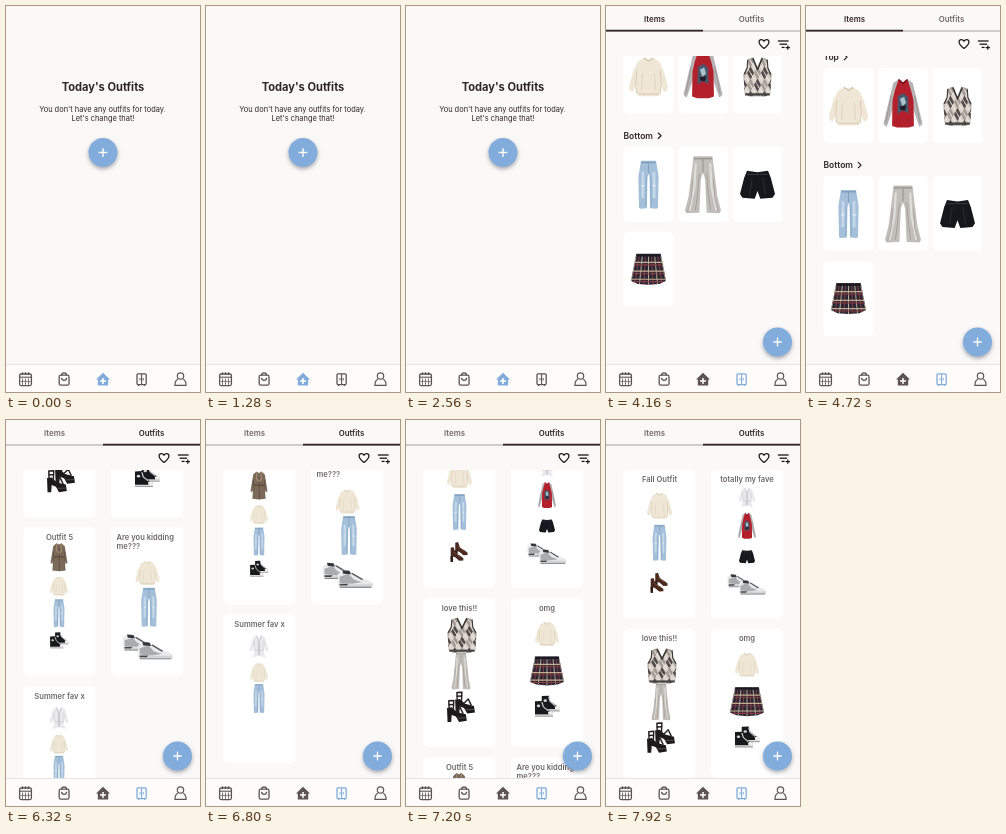
These frames come from a looping animation (194x386 px, 8 s). An HTML page with a canvas:

```html
<!DOCTYPE html>
<html lang="en">
<head>
<meta charset="utf-8">
<title>Wardrobe planner</title>
<style>
html, body { margin: 0; width: 100%; height: 100%; overflow: hidden; background: #fbf9f8; }
canvas { display: block; width: 194px; height: 386px; }
</style>
</head>
<body>
<canvas id="stage"></canvas>
<script>
const W = 194, H = 386, LOOP = 8000;
const INK = '#2f2527', GREY = '#706869', BLUE = '#82acdb', BG = '#fbf9f8', NAV = '#5d5254';
const canvas = document.getElementById('stage');
const c = canvas.getContext('2d');
const dpr = window.devicePixelRatio || 1;
canvas.width = W * dpr;
canvas.height = H * dpr;

// ---------- timing ----------
const OPEN = 3200;
const itemScroll = [[4000, 0], [4080, 16], [4160, 40], [4280, 54], [4420, 50], [4640, 18], [4860, 3], [5040, 0]];
const swipe = [[5060, 0], [5200, 8], [5280, 28], [5400, 98], [5520, 163], [5640, 190], [5760, 194]];
const outfitScroll = [[5880, 0], [6040, 42], [6180, 140], [6320, 260], [6460, 318], [6640, 338],
  [6760, 338], [6880, 300], [7040, 130], [7200, 31], [7360, 9], [7560, 2], [7840, 0]];

// Monotone cubic through [time, value] keys
function track(keys, t) {
  const last = keys.length - 1;
  if (t <= keys[0][0]) return keys[0][1];
  if (t >= keys[last][0]) return keys[last][1];
  const slope = i => (keys[i + 1][1] - keys[i][1]) / (keys[i + 1][0] - keys[i][0]);
  const tangent = i => {
    if (i === 0 || i === last) return 0;
    const a = slope(i - 1), b = slope(i);
    return a * b <= 0 ? 0 : 2 * a * b / (a + b);
  };
  let i = 0;
  while (t > keys[i + 1][0]) i++;
  const [t0, v0] = keys[i], [t1, v1] = keys[i + 1];
  const d = t1 - t0, u = (t - t0) / d, u2 = u * u, u3 = u2 * u;
  return v0 * (2 * u3 - 3 * u2 + 1) + tangent(i) * d * (u3 - 2 * u2 + u)
    + v1 * (3 * u2 - 2 * u3) + tangent(i + 1) * d * (u3 - u2);
}

const clamp = x => Math.max(0, Math.min(1, x));
const mix = (a, b, k) => `rgb(${a.map((v, i) => Math.round(v + (b[i] - v) * k))})`;

// ---------- drawing helpers ----------
function text(str, x, y, size, weight, color, align = 'center') {
  c.font = `${weight} ${size}px Inter, sans-serif`;
  c.fillStyle = color;
  c.textAlign = align;
  c.fillText(str, x, y);
}

function trace(pts) {
  c.beginPath();
  for (let i = 0; i < pts.length; i += 2) c.lineTo(pts[i], pts[i + 1]);
}

function line(pts, color, width) {
  trace(pts);
  c.strokeStyle = color;
  c.lineWidth = width;
  c.stroke();
}

function poly(color, pts) {
  trace(pts);
  c.closePath();
  c.fillStyle = color;
  c.fill();
}

// Right half listed from top to bottom, mirrored to the left
function sym(color, half) {
  const pts = half.slice();
  for (let i = half.length - 2; i >= 0; i -= 2) pts.push(-half[i], half[i + 1]);
  poly(color, pts);
}

function pair(pts, color, width) {
  line(pts, color, width);
  line(pts.map((v, i) => i % 2 ? v : -v), color, width);
}

function box(x, y, w, h, r, color) {
  c.beginPath();
  c.roundRect(x, y, w, h, r);
  c.fillStyle = color;
  c.fill();
}

function dot(x, y, rx, ry, color) {
  c.beginPath();
  c.ellipse(x, y, rx, ry, 0, 0, 7);
  c.fillStyle = color;
  c.fill();
}

function shifted(x, y, k, fn) {
  c.save();
  c.translate(x, y);
  c.scale(k, k);
  fn();
  c.restore();
}

// ---------- clothes, each in a box from -1 to 1 ----------
const wear = {
  sweater() {
    sym('#f0e6d6', [0, -.86, .22, -.98, .55, -.78, .78, -.3, 1, .5, .96, .72, .8, .78, .64, .4, .62, .86, .5, 1, 0, 1]);
    pair([.6, -.3, .66, .4, .6, .85], '#d8cab4', .05);
    pair([.3, -.2, .36, .7], '#e3d7c4', .06);
    line([-.24, -.96, 0, -.82, .24, -.96], '#d5c6ae', .07);
    line([-.55, .88, .55, .88], '#dccfba', .06);
  },
  raglan() {
    sym('#b7b2b4', [0, -.8, .24, -.96, .5, -.82, .72, -.1, 1, .85, .84, .98, .5, .2, .4, 0, 0, 0]);
    pair([.6, -.3, .88, .8], '#9b9598', .05);
    sym('#b3202c', [0, -.84, .22, -.98, .42, -.5, .54, -.1, .56, .93, .3, 1, 0, 1]);
    line([-.22, -.96, 0, -.8, .22, -.96], '#7d131d', .07);
    poly('#47566a', [-.26, -.3, .05, -.4, .28, -.22, .26, .1, .3, .42, -.02, .3, -.28, .44]);
    poly('#a8c3c9', [-.16, -.18, .06, -.26, .16, 0, -.04, .12]);
    poly('#201c25', [-.18, .14, .18, .1, .1, .3, -.12, .28]);
  },
  vest() {
    const shape = [0, -.4, .32, -1, .66, -.9, .74, -.45, 1, -.12, .92, .86, .6, 1, 0, 1];
    sym('#d8d2c8', shape);
    c.save();
    c.clip();
    for (let i = -2; i <= 2; i++) for (let j = -1; j <= 2; j++) {
      const x = i * .5, y = j * .62 - .2;
      poly((i + j) % 2 ? '#514b4b' : '#a39b94', [x, y - .34, x + .25, y, x, y + .34, x - .25, y]);
      line([x - .5, y - .62, x + .5, y + .62], '#efebe3', .04);
    }
    c.restore();
    line([-.34, -.96, 0, -.38, .34, -.96], '#3d3838', .11);
    pair([.7, -.88, .74, -.45, .96, -.12], '#3d3838', .08);
    line([-.88, .9, .88, .9], '#4a4545', .12);
  },
  jeans() {
    sym('#a3bfd9', [0, -1, .68, -1, .92, -.35, .86, .95, .74, 1, .14, .98, .1, -.3, 0, -.46]);
    pair([.5, -.55, .52, .55], '#c5d8e8', .25);
    pair([.2, -.35, .24, .9], '#83a3c2', .06);
    line([-.66, -.93, .66, -.93], '#7f9dbb', .06);
    line([0, -.9, 0, -.48], '#7897b6', .07);
    pair([.38, .02, .66, .04], '#eef3f6', .05);
  },
  silver() {
    sym('#c2bfbb', [0, -1, .52, -1, .66, -.3, .8, .4, 1, .9, .92, 1, .2, .98, .12, -.2, 0, -.42]);
    pair([.4, -.75, .48, .1, .75, .9], '#e0deda', .12);
    pair([.2, -.4, .3, .3, .42, .9], '#a19d99', .05);
    pair([.58, -.2, .66, .5, .86, .95], '#a9a5a1', .05);
    line([-.52, -.92, .52, -.92], '#9b9793', .05);
    line([0, -.9, 0, -.44], '#96928e', .06);
  },
  shorts() {
    sym('#15171d', [0, -.9, .6, -1, .76, -.5, 1, .66, .86, .92, .16, 1, 0, .44]);
    line([-.58, -.74, .58, -.74], '#343740', .08);
    pair([.3, -.5, .45, .7], '#292c34', .06);
  },
  skirt() {
    sym('#292735', [0, -1, .7, -1, 1, .74, .62, .94, 0, 1]);
    c.save();
    c.clip();
    for (let i = -4; i <= 4; i++) {
      line([i * .17, -1, i * .26, 1], i % 2 ? '#8b3d42' : '#c9b79d', .055);
    }
    [-.45, .12, .64].forEach(y => {
      line([-1, y, 1, y], '#c3ad90', .08);
      line([-1, y + .16, 1, y + .16], '#843b42', .08);
    });
    c.restore();
    line([-.7, -.9, .7, -.9], '#1b1a24', .16);
  },
  coat() {
    sym('#7c6a59', [0, -.9, .3, -1, .68, -.78, 1, .4, .78, .5, .66, .1, .78, .95, 0, 1]);
    line([0, -.6, .04, .95], '#51453a', .08);
    pair([.25, -.95, .3, -.5, .05, -.3], '#a18c77', .12);
    line([-.62, -.02, .62, -.02], '#594c40', .1);
    pair([.66, -.4, .62, .4], '#5f5145', .07);
  },
  blouse() {
    sym('#e9e9ec', [0, -.7, .28, -1, .62, -.75, 1, .3, .78, .46, .5, -.1, .48, .5, .7, .95, 0, .8]);
    pair([.26, -.95, .06, -.45, .04, .75], '#bfbfc6', .07);
    pair([.52, -.5, .5, .4], '#c9c9cf', .06);
    line([-.45, .32, .45, .32], '#c3c3ca', .06);
  },
  heels() {
    const shoe = () => {
      poly('#4a2a20', [-.9, -.9, -.5, -1, -.2, -.2, .5, .2, .9, .5, .9, .8, .3, .85, -.3, .35, -.6, .3, -.6, 1, -.9, 1]);
      poly('#2a1713', [-.92, .2, -.58, .3, -.6, 1, -.9, 1]);
      line([-.5, -.35, -.1, -.1, .5, .4], '#7c4a37', .12);
    };
    shifted(.2, -.28, .72, shoe);
    shifted(-.26, .26, .74, shoe);
  },
  platforms() {
    const shoe = () => {
      poly('#1d1a1c', [-.95, -.3, -.5, -.35, 0, .1, .85, .3, .95, .9, .2, 1, -.1, .5, -.5, .35, -.55, 1, -.9, 1]);
      line([-.75, -.3, -.78, -.95, -.3, -.98, -.35, -.1], '#231f21', .14);
      line([-.8, -.6, -.3, -.62], '#231f21', .14);
      line([-.1, .05, .3, -.35, .6, .25], '#2a2527', .14);
      line([.05, .65, .9, .62], '#6f686a', .06);
    };
    shifted(.28, -.28, .72, shoe);
    shifted(-.28, .28, .72, shoe);
  },
  sneakers() {
    const shoe = () => {
      poly('#e9e9ea', [-1, -.5, -.7, -.9, -.3, -.8, .1, -.2, .75, .2, 1, .5, .95, .85, -.9, .85, -1, .4]);
      poly('#a9abaf', [-.9, -.2, -.4, -.5, -.1, .1, .35, .4, -.2, .55, -.9, .45]);
      poly('#35363b', [-.75, -.88, -.35, -.82, -.25, -.45, -.7, -.5]);
      line([-.2, -.55, .4, .12], '#54565b', .12);
      poly('#d3d4d6', [-1, .6, .98, .6, .95, .9, -.92, .9]);
      line([-.9, .92, .9, .92], '#6a6c70', .1);
      poly('#46474c', [-.9, .55, -.4, .55, -.5, .75, -.9, .75]);
    };
    shifted(-.36, -.3, .64, shoe);
    shifted(.3, .3, .7, shoe);
  },
  hightops() {
    const shoe = () => {
      poly('#18191d', [-.85, -.95, -.15, -1, 0, -.3, .55, .25, .9, .5, .9, .8, -.85, .8]);
      poly('#f0efed', [.45, .4, .75, .3, .97, .6, .95, .8, .5, .8]);
      line([-.88, .86, .95, .86], '#e8e6e3', .2);
      line([-.85, .97, .95, .97], '#3c3c40', .06);
      line([-.16, -.85, -.02, -.25, .48, .28], '#d9d8d6', .12);
      dot(-.5, -.35, .17, .17, '#d5d5d6');
    };
    shifted(.24, -.24, .74, shoe);
    shifted(-.26, .26, .74, shoe);
  }
};

function put(name, x, y, w, h) {
  c.save();
  c.translate(x, y);
  c.scale(w / 2, h / 2);
  wear[name]();
  c.restore();
}

// ---------- interface pieces ----------
function fab(x, y) {
  c.save();
  c.shadowColor = 'rgba(40,40,60,.38)';
  c.shadowBlur = 4 * dpr;
  c.shadowOffsetY = 2 * dpr;
  dot(x, y, 14.5, 14.5, BLUE);
  c.restore();
  line([x - 4.3, y, x + 4.3, y], '#fff', 1.4);
  line([x, y - 4.3, x, y + 4.3], '#fff', 1.4);
}

function navBar(active) {
  box(0, 358, W, 28, 0, '#fdfcfb');
  line([0, 358.5, W, 358.5], '#e6e3e2', 1);
  const frame = (x, y, w, h, r, color) => {
    c.beginPath();
    c.roundRect(x, y, w, h, r);
    c.strokeStyle = color;
    c.lineWidth = 1.3;
    c.stroke();
  };
  // calendar
  frame(13.6, 368, 11.8, 11.6, 1.5, NAV);
  line([13.6, 371.2, 25.4, 371.2], NAV, 1.1);
  [16.5, 19.5, 22.5].forEach(x => {
    line([x, 366.2, x, 369], NAV, 1.3);
    line([x, 372.5, x, 378.8], NAV, .8);
  });
  line([14.5, 375.4, 24.5, 375.4], NAV, .7);
  // bag
  frame(53.2, 369.2, 9.8, 10, 1.5, NAV);
  c.beginPath();
  c.arc(58.1, 369.4, 2.5, Math.PI, 0);
  c.stroke();
  c.beginPath();
  c.arc(58.1, 371.8, 2.5, 0, Math.PI);
  c.stroke();
  // house
  const home = active === 'home' ? BLUE : NAV;
  poly(home, [97, 366.8, 104, 373.6, 102.2, 373.6, 102.2, 379.4, 91.8, 379.4, 91.8, 373.6, 90, 373.6]);
  line([94, 375, 100, 375], '#fff', 1.5);
  line([97, 372, 97, 378], '#fff', 1.5);
  // closet
  const closet = active === 'closet' ? BLUE : NAV;
  frame(131, 367.8, 9.2, 10.8, 1, closet);
  line([135.6, 368, 135.6, 378.6], closet, 1.1);
  line([134, 372, 134, 374.4], closet, 1);
  line([137.2, 372, 137.2, 374.4], closet, 1);
  line([132.6, 378.6, 132.6, 380], closet, 1.3);
  line([138.6, 378.6, 138.6, 380], closet, 1.3);
  // person
  c.strokeStyle = NAV;
  c.lineWidth = 1.2;
  c.beginPath();
  c.arc(174.5, 370, 3.2, 0, 7);
  c.stroke();
  c.beginPath();
  c.moveTo(171.8, 373.2);
  c.quadraticCurveTo(169, 374.4, 168.9, 379.4);
  c.lineTo(180.1, 379.4);
  c.quadraticCurveTo(180, 374.4, 177.2, 373.2);
  c.stroke();
}

function pageTools() {
  c.beginPath();
  c.moveTo(158, 42.6);
  c.bezierCurveTo(151.5, 37.6, 152.4, 33.6, 155.2, 33.6);
  c.quadraticCurveTo(157, 33.6, 158, 35.2);
  c.quadraticCurveTo(159, 33.6, 160.8, 33.6);
  c.bezierCurveTo(163.6, 33.6, 164.5, 37.6, 158, 42.6);
  c.strokeStyle = '#1d1718';
  c.lineWidth = 1.3;
  c.stroke();
  line([171.8, 35, 182.6, 35], '#1d1718', 1.3);
  line([173.6, 38.2, 181, 38.2], '#1d1718', 1.3);
  line([175.6, 41.4, 178.6, 41.4], '#1d1718', 1.3);
  line([179.6, 41.6, 184, 41.6], '#1d1718', 1.2);
  line([181.8, 39.4, 181.8, 43.8], '#1d1718', 1.2);
}

function heading(label, y) {
  text(label, 17.5, y + 3, 8.5, 600, INK, 'left');
  const x = 17.5 + c.measureText(label).width + 5;
  line([x, y - 3, x + 3.1, y, x, y + 3], INK, 1.3);
}

function scrollArea(offset, fn) {
  c.save();
  c.beginPath();
  c.rect(0, 50, W, 308);
  c.clip();
  c.translate(0, -offset);
  fn();
  c.restore();
}

const itemPics = [
  ['sweater', 42.5, 111, 39, 39], ['raglan', 97, 108, 39, 49], ['vest', 151.5, 111, 28, 39],
  ['jeans', 42.5, 219, 22, 48], ['silver', 97, 219, 36, 57], ['shorts', 151.5, 219, 35, 28],
  ['skirt', 42.5, 303.5, 35, 31]
];

const outfits = [
  ['Fall Outfit', ['sweater', 53.5, 36, 25, 26], ['jeans', 53.5, 73, 15, 36], ['heels', 53.5, 113, 19, 20]],
  ['totally my fave', ['blouse', 141, 28, 17, 20], ['raglan', 141, 56, 18, 26], ['shorts', 141, 87, 16, 13],
    ['sneakers', 141, 114, 39, 22]],
  ['love this!!', ['vest', 56, 37, 29, 35], ['silver', 55, 73, 19, 37], ['platforms', 55, 109, 29, 30]],
  ['omg', ['sweater', 141, 36, 24, 24], ['skirt', 141, 73, 34, 29], ['hightops', 141, 108, 27, 21]],
  ['Outfit 5', ['coat', 53, 30, 17, 28], ['sweater', 53, 59, 18, 19], ['jeans', 53, 86, 12, 28],
    ['hightops', 53, 113, 20, 16]],
  ['Are you kidding|me???', ['sweater', 141.5, 46, 24, 24], ['jeans', 143, 80, 17, 39],
    ['sneakers', 142, 119, 50, 27]],
  ['Summer fav x', ['blouse', 53, 32, 19, 23], ['sweater', 53, 58, 18, 19], ['jeans', 53, 84, 12, 29]]
];

function itemsPage(t) {
  scrollArea(track(itemScroll, t), () => {
    heading('Top', 62);
    heading('Bottom', 170);
    itemPics.forEach((pic, i) => {
      box(17.5 + i % 3 * 54.5, [73, 181, 266][Math.floor(i / 3)], 50, 75, 5, '#fff');
      c.globalAlpha = clamp((t - OPEN - 40 - i * 20) / 240);
      put(...pic);
      c.globalAlpha = 1;
    });
  });
  pageTools();
  fab(171.5, 336);
}

function outfitsPage(t) {
  scrollArea(track(outfitScroll, t), () => {
    outfits.forEach(([title, ...pics], i) => {
      const x = i % 2 ? 105 : 17.5, y = 49.7 + Math.floor(i / 2) * 159;
      box(x, y, 72, 149, 5, '#fff');
      const rows = title.split('|');
      rows.forEach((row, n) => rows.length > 1
        ? text(row, x + 5.5, y + 12.6 + n * 9.3, 7.6, 600, GREY, 'left')
        : text(row, x + 36, y + 12.6, 7.6, 600, GREY));
      pics.forEach(([name, px, py, w, h]) => put(name, px, y + py, w, h));
    });
  });
  pageTools();
  fab(171.5, 336);
}

function closet(t) {
  const shift = track(swipe, t), k = shift / W;
  const dark = [47, 37, 39], dim = [112, 104, 105];
  [[itemsPage, -shift], [outfitsPage, W - shift]].forEach(([page, x]) => {
    if (Math.abs(x) >= W) return;
    c.save();
    c.translate(x, 0);
    page(t);
    c.restore();
  });
  text('Items', 48.5, 16.3, 7.8, 600, mix(dark, dim, k));
  text('Outfits', 145.5, 16.3, 7.8, 600, mix(dim, dark, k));
  line([0, 25, W, 25], '#8d8687', .8);
  line([shift / 2, 24.6, shift / 2 + 97, 24.6], INK, 1.6);
  navBar('closet');
}

function home() {
  text("Today's Outfits", 97, 85, 11.1, 700, INK);
  text("You don't have any outfits for today.", 96.5, 105.8, 7.45, 400, INK);
  text("Let's change that!", 97, 115, 7.45, 400, INK);
  fab(97, 146.5);
  navBar('home');
}

function draw(t) {
  c.setTransform(dpr, 0, 0, dpr, 0, 0);
  c.lineJoin = 'round';
  box(0, 0, W, H, 0, BG);
  if (t < OPEN) home();
  else closet(t);
}

const start = performance.now();
function tick() {
  draw((performance.now() - start) % LOOP);
  requestAnimationFrame(tick);
}
tick();
</script>
</body>
</html>
```
